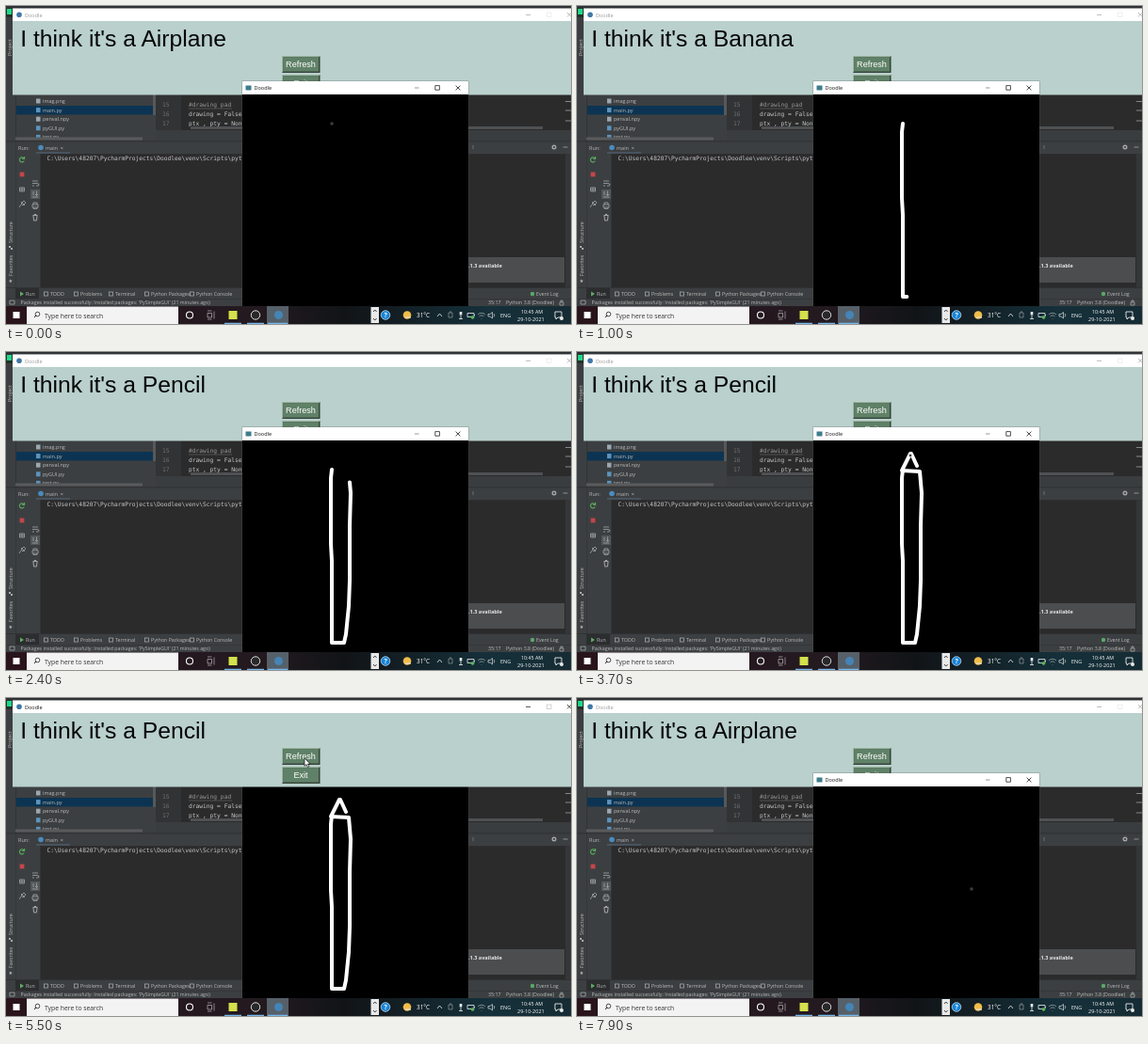
An HTML page that plays this animation: 600 by 338 pixels, repeating every 8000 ms.

```html
<!DOCTYPE html>
<html lang="en">
<head>
<meta charset="utf-8">
<title>Doodle</title>
<style>
html, body { margin: 0; width: 100%; height: 100%; overflow: hidden; background: #2b2b2b; }
svg { display: block; width: 100vw; height: 100vh; }
text { font: 5.5px "Open Sans", "Noto Sans", sans-serif; fill: #bbb; white-space: pre; }
.small text { font-size: 5.25px; }
.code text { font: 6.25px "DejaVu Sans Mono", monospace; fill: #c4c6c8; }
.big { font: 24.7px "Liberation Sans", Arial, sans-serif; fill: #050505; }
.btn text { font: 9.1px "Liberation Sans", Arial, sans-serif; fill: #fff; text-anchor: middle; }
.line { fill: none; stroke: #a4a6a8; stroke-width: .8; }
.title { fill: #999; }
.front .title { fill: #111; }
.ctl { fill: none; stroke: #aaa; stroke-width: .8; }
.front .ctl { stroke: #222; }
.ctl.faint { opacity: .25; }
.bar text { fill: #fff; }
</style>
</head>
<body>
<svg viewBox="0 0 600 338" preserveAspectRatio="none">
  <defs>
    <linearGradient id="glow">
      <stop offset="0" stop-color="#2a141c"/>
      <stop offset=".45" stop-color="#231a20"/>
      <stop offset=".6" stop-color="#111417"/>
      <stop offset=".85" stop-color="#15303a"/>
      <stop offset="1" stop-color="#162c34"/>
    </linearGradient>
  </defs>
  <rect width="600" height="338" fill="#3c3f41"/>
  <rect width="600" height="2" fill="#303335"/>
  <rect y="2" width="7" height="10" fill="#23332a"/>
  <rect x="1" y="3" width="5" height="6" fill="#21d789"/>

  <!-- project tree -->
  <rect x="10" y="16" width=".7" height="128" fill="#2c2e30"/>
  <rect x="11" y="106" width="146" height="9.5" fill="#0c3452"/>
  <g id="files"></g>
  <rect x="10" y="139.5" width="135" height="3" fill="#585a5c"/>
  <rect x="156" y="94" width="3" height="22" fill="#56585a"/>
  <text transform="translate(6 53) rotate(-90)">Project</text>

  <!-- editor -->
  <rect x="159" y="16" width="441" height="116" fill="#2b2b2b"/>
  <rect x="159" y="16" width="27" height="116" fill="#313335"/>
  <rect x="196" y="128" width="374" height="3" fill="#4f5153"/>
  <path d="M594 101.500h6M594 111h6M594 122h6" stroke="#85878a" stroke-width="1"/>
  <rect x="159" y="132" width="441" height="12" fill="#3a3d3f"/>
  <rect y="143.5" width="600" height=".8" fill="#2a2c2e"/>
  <g class="code">
    <g opacity=".4"><text x="166" y="107.3">15</text><text x="166" y="117.3">16</text><text x="166" y="127">17</text></g>
    <text x="194" y="107" style="fill:#969696">#drawing pad</text>
    <path d="M194 109h46" stroke="#777" stroke-width=".5"/>
    <text x="194" y="117.3">drawing = False</text>
    <text x="194" y="127">ptx , pty = None</text>
  </g>

  <!-- run panel -->
  <text x="13" y="152.6">Run:</text>
  <circle cx="37" cy="150.5" r="2.8" fill="#4b8bbe"/>
  <text x="42" y="152.6">main  ×</text>
  <rect x="32" y="155.5" width="36" height="1" fill="#54697d"/>
  <rect x="37" y="157.2" width="563" height="142" fill="#2c2b2c"/>
  <rect x="594" y="157" width="6" height="142" fill="#343638"/>
  <g class="code"><text x="43.5" y="163.8">C:\Users\48207\PycharmProjects\Doodlee\venv\Scripts\python.exe</text></g>
  <g class="line">
    <path d="M496 148v4" opacity=".6"/>
    <circle cx="582" cy="150" r="1.8" stroke-width="1.4"/><path d="M591.5 150h5"/>
    <path d="M19 162a2.500 2.500 0 1 0 .2 2.500M19.500 160v2.500h-2.500" stroke="#57a65b" stroke-width="1.2"/>
    <path d="M14.5 193h5v4h-5zM17 193v4M14.5 195h5"/>
    <path d="M16 208l4 4M19 207l2 2-3 3-2-2zM16 211l-2 3"/>
    <path d="M28 186h6M28 188.5h5q2 0 2 1.5t-3 1M28 191h2"/>
    <rect x="26" y="195" width="10" height="10" fill="#54585b" stroke="none"/>
    <path d="M28 198h2M28 200h2M28 203h6M32.5 196.5v5M31 200l1.5 1.5 1.5-1.5"/>
    <path d="M28 211h6v3h-6zM29 211v-2h4v2M29 214v1.5h4V214"/>
    <path d="M28.500 222.500h5M29 223l.5 5h3l.5-5M30 221.500h2" stroke-width="1"/>
  </g>
  <rect x="14.6" y="176.6" width="4.8" height="4.8" fill="#c4464a"/>
  <rect x="36.5" y="157" width=".7" height="142" fill="#292b2d"/>
  <rect x="10" y="144" width=".7" height="156" fill="#333638"/>
  <g class="small">
    <text transform="translate(7 252) rotate(-90)">Structure</text>
    <text transform="translate(7 287) rotate(-90)">Favorites</text>
    <text x="2.5" y="294">★</text>
    <path d="M3 255h2v2H3zM5 257h2v2H5z" fill="#aaa"/>
  </g>
  <rect x="440" y="267" width="153" height="27" fill="#4b4d4f"/>
  <text x="491" y="278" style="font-weight:700;fill:#e8e8e8">.1.3 available</text>

  <!-- tool tabs and status -->
  <rect y="299.5" width="600" height="12" fill="#3c3f41"/>
  <rect y="299.2" width="600" height=".7" fill="#2b2d2f"/>
  <rect x="10" y="300" width="25" height="11" fill="#2b2d2f"/>
  <path d="M15 303.5v5l4-2.5z" fill="#5fad65"/>
  <g class="small" id="tabs"></g>
  <circle cx="559" cy="306" r="2.2" fill="#59a869"/>
  <rect y="311" width="600" height=".6" fill="#2f3133"/>
  <g class="small">
    <text x="15.5" y="317">Packages installed successfully: Installed packages: 'PySimpleGUI' (21 minutes ago)</text>
    <text x="512" y="317">35:17</text>
    <text x="531" y="317">Python 3.8 (Doodlee)</text>
  </g>
  <path class="line" d="M4 313h5v4H4zM588 315h4v3h-4zM589 315v-2h2v2"/>

  <g id="wins">
    <g id="gui">
      <rect x="7" y="2.5" width="593" height="13.500" fill="#fff"/>
      <rect x="7" y="16" width="593" height="78.5" fill="#b9d0cc"/>
      <circle cx="14" cy="9.3" r="2.8" fill="#3f78a6"/>
      <text class="title" x="20" y="11.5">Doodle</text>
      <path class="ctl" d="M552 9.4h5M596 7l4.5 4.5M600.5 7l-4.5 4.5"/>
      <path class="ctl faint" d="M574.5 7h4.5v4.5h-4.5z"/>
      <text class="big" x="15.2" y="43.400">I think it's a <tspan id="guess"></tspan></text>
      <g class="btn" id="buttons"></g>
    </g>
    <g id="pad">
      <rect x="250.5" y="79.5" width="241" height="240" fill="#555" opacity=".5"/>
      <rect x="251" y="80" width="240" height="14" fill="#fff"/>
      <rect x="251" y="94" width="240" height="225" fill="#000"/>
      <rect x="254.5" y="84.5" width="6" height="5" fill="#3d7d8c"/>
      <text class="title" x="263.5" y="89">Doodle</text>
      <path class="ctl" d="M455.8 84.6h4.6v4.6h-4.6zM477.6 84.6l4.8 4.8M482.4 84.6l-4.8 4.8"/>
      <path class="ctl" d="M434 87h4.500" opacity=".6"/>
      <polyline id="ink" fill="none" stroke="#fff" stroke-width="4" stroke-linecap="round" stroke-linejoin="round"/>
    </g>
  </g>

  <!-- taskbar -->
  <g class="bar">
    <rect y="319" width="600" height="19" fill="url(#glow)"/>
    <rect x="7.5" y="325" width="7" height="7" fill="#fff"/>
    <rect x="22" y="319.5" width="161" height="18.5" fill="#f3f3f3"/>
    <path d="M30 331l2-2" stroke="#222"/><circle cx="33.5" cy="327.5" r="2.3" fill="none" stroke="#222" stroke-width=".8"/>
    <text x="41" y="331.5" style="font-size:6.8px;fill:#333">Type here to search</text>
    <g class="line" style="stroke:#fff">
      <circle cx="195" cy="328.5" r="3.5" stroke-width="1.1"/>
      <path d="M214 326.5h4.5v4.5H214zM214 324h4.5M214 333h4.5M221 324.5v8" opacity=".6"/>
    </g>
    <rect x="277" y="319" width="23" height="19" fill="#566069"/>
    <rect x="236.5" y="324" width="9" height="9" fill="#d5e04d"/>
    <circle cx="265" cy="328.5" r="4.7" fill="#282828" stroke="#ddd" stroke-width="1"/>
    <circle cx="289.5" cy="328.5" r="4.5" fill="#4584b6"/>
    <path d="M232 337.3h18M256 337.3h18M278 337.3h21" stroke="#76b9ed" stroke-width="1.3"/>
    <rect x="387.5" y="320" width="8.5" height="17" fill="#e9e9e9"/>
    <path d="M390 325l1.8-2 1.8 2M390 332l1.8 2 1.8-2" fill="none" stroke="#333" stroke-width=".9"/>
    <circle cx="403" cy="328.5" r="4.8" fill="#1684d8" stroke="#fff" stroke-width=".6"/>
    <text x="401.4" y="331" style="font-weight:700;font-size:7px">?</text>
    <circle cx="426" cy="328.5" r="4.3" fill="#f0bd4a"/>
    <path d="M424 331h6" stroke="#e5dcc4" stroke-width="1.4"/>
    <text x="436" y="331" style="font-size:6.4px">31°C</text>
    <g class="line" style="stroke:#eee">
      <path d="M458 330l2.5-3 2.5 3"/>
      <path d="M470 326h4v5h-4zM471 325h2" opacity=".5"/>
      <path d="M483 325v3.500" stroke-width="2.6"/><path d="M483 329v4M481 332.500h4"/>
      <path d="M490 326.5h7v4h-7zM497.500 328v1"/>
      <path d="M501 328a5.500 5.500 0 0 1 8 0M502.500 330a3.400 3.400 0 0 1 5 0M505 332v.5" opacity=".6"/>
      <path d="M512 327.5h2l2.5-2v6.5l-2.5-2h-2zM518 327q1.5 1.7 0 3.4" opacity=".8"/>
    </g>
    <circle cx="495.500" cy="331" r="1.8" fill="#58b957"/>
    <text x="525" y="331">ENG</text>
    <text x="547" y="326.5" style="font-size:5.3px">10:45 AM</text>
    <text x="543" y="335">29-10-2021</text>
    <path class="line" style="stroke:#fff" d="M583 325h7v6h-4l-2 2v-2h-1z"/>
    <circle cx="590" cy="332" r="2" fill="#e8e8e8"/>
  </g>
  <rect id="cross" width="2" height="2" fill="#000" stroke="#777" stroke-width=".6"/>
  <path id="arrow" d="M0 0v8.4l2-1.8 1.4 3 1.5-.7-1.4-2.9h2.7z" fill="#fff" stroke="#111" stroke-width=".7"/>
</svg>
<script>
const $ = id => document.getElementById(id);
const fill = (id, items, make) => $(id).innerHTML = items.map(make).join("");

fill("files", ["imag.png", "main.py", "penval.npy", "pyGUI.py", "test.py"], (name, i) => {
  const y = 101 + i * 9.6, color = name.endsWith(".py") ? "#5b93bd" : "#9aa7b0";
  return `<rect x="32" y="${y - 2.5}" width="4.5" height="5" fill="${color}"/>
    <text x="39" y="${y + 2}">${name}</text>`;
});
fill("tabs", [["Run", 21], ["TODO", 47], ["Problems", 79], ["Terminal", 116], ["Python Packages", 154],
  ["Python Console", 202], ["Event Log", 563]], ([name, x], i) =>
  `<text x="${x}" y="308">${name}</text>` +
  (i && i < 6 ? `<rect class="line" x="${x - 6.5}" y="304" width="4" height="4"/>` : ""));
fill("buttons", [["Refresh", 53], ["Exit", 73]], ([name, y]) =>
  `<rect x="293" y="${y}" width="40.5" height="18" fill="#354239"/>
   <path d="M293 ${y + 18}v-18h40.5l-1.2 1.2h-38.1v15.6z" fill="#9db5a2"/>
   <rect x="294.2" y="${y + 1.2}" width="37.8" height="15.4" fill="#5f8167"/>
   <text x="313" y="${y + 12}">${name}</text>`);

// [time, x, y]
const pen = [[0, 346, 125], [100, 345, 134], [300, 345, 175], [400, 345, 204], [500, 346, 222],
  [900, 346, 309], [1200, 359, 309], [1300, 361, 300], [1500, 364, 270], [1800, 365, 243],
  [2100, 365, 185], [2300, 366, 150], [2500, 364, 127], [2700, 345, 126], [3000, 354, 108],
  [3100, 355, 108], [3300, 361, 121]];
const mouse = [[3600, 361, 121], [3700, 354, 110], [4500, 330, 86], [4700, 317, 64],
  [6100, 317, 64], [6300, 324, 75]];

function at(keys, t) {
  const i = keys.findIndex(k => k[0] > t);
  if (i < 0) return keys.at(-1).slice(1);
  if (!i) return keys[0].slice(1);
  const [a, b] = [keys[i - 1], keys[i]], p = (t - a[0]) / (b[0] - a[0]);
  return [a[1] + (b[1] - a[1]) * p, a[2] + (b[2] - a[2]) * p];
}

function place(id, show, [x, y]) {
  $(id).style.display = show ? "" : "none";
  $(id).setAttribute("transform", `translate(${x} ${y})`);
}

function draw(t) {
  const guiFront = t >= 5500 && t < 7900;
  const front = $(guiFront ? "gui" : "pad");
  if ($("wins").lastElementChild !== front) $("wins").append(front);
  $("gui").classList.toggle("front", guiFront);
  $("pad").classList.toggle("front", !guiFront);

  $("guess").textContent = t < 200 || t >= 5900 ? "Airplane" : t < 1200 ? "Banana" : "Pencil";
  const trail = t >= 100 && t < 5900 ? [...pen.filter(k => k[0] <= t).map(k => k.slice(1)), at(pen, t)] : [];
  $("ink").setAttribute("points", trail.join(" "));

  const pos = t < 100 ? [346, 125] : t >= 7900 ? [419, 203] : at(mouse, t);
  const overPad = pos[1] > 94;
  place("cross", overPad && (t < 100 || t >= 3400), [pos[0] - 1, pos[1] - 1]);
  place("arrow", !overPad && t < 6500, pos);
}

const start = performance.now();
function tick() {
  const t = (performance.now() - start) % 8000;
  draw(Math.floor(t / 100) * 100); // ten pictures a second
  requestAnimationFrame(tick);
}
tick();
</script>
</body>
</html>
```
